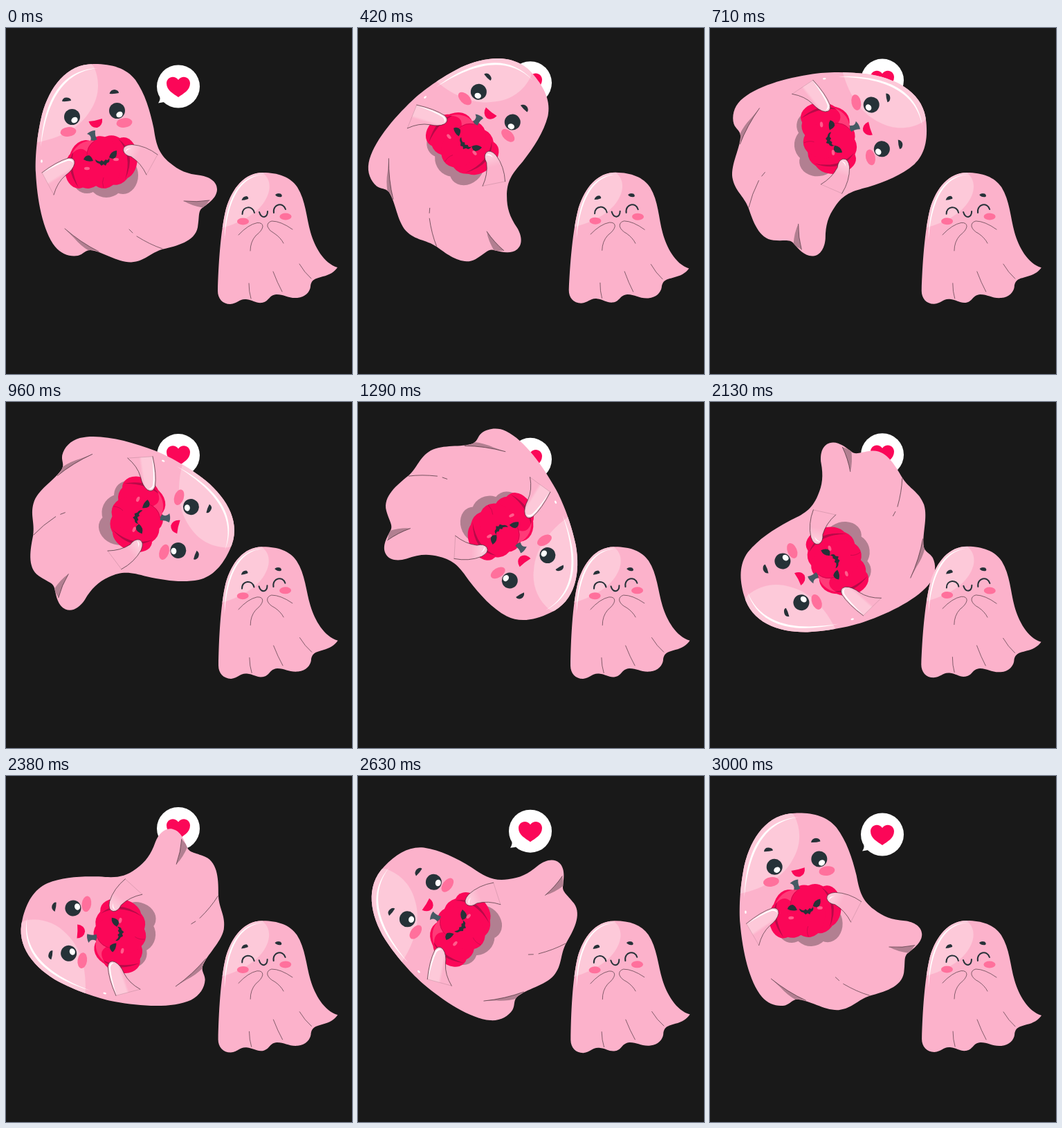
Recreate the animation shown at these times as an HTML page. Size 500 by 500 pixels, loop 3040 ms.

```html
<!DOCTYPE html>
<html>
<head>
<meta charset="utf-8">
<style>
  html, body { margin: 0; width: 100%; height: 100%; overflow: hidden; background: #191919; }
  svg { display: block; width: 100vw; height: 100vh; }
  .body { fill: #fcb2cb; }
  .gloss { fill: #fdc9d9; }
  .shade { fill: #b27f91; }
  .red { fill: #fb0758; }
  .deep { fill: #b80a48; }
  .dark { fill: #263238; }
  .cheek { fill: #ff709c; }
  .white { fill: #fff; }
  .line { fill: none; stroke: #33242a; stroke-width: .6; stroke-linecap: round; }
  .smile { fill: none; stroke: #263238; stroke-width: 2; stroke-linecap: round; }
</style>
</head>
<body>
<svg viewBox="0 0 500 500">
  <defs>
    <path id="bigShape" d="M128 52C88 51 63 85 52 125C44 158 42 190 43 209C45 248 53 293 71 316C80 327 93 331 104 329C112 327 114 321 122 321C140 323 161 339 181 338.500C201 337 208 325 227 319.500C246 315 273 309 277 288C280 271 277 264 285 259C293 253 305 245 305 233C305 222 294 215 281 213C262 211 250 206 237 195C220 181 217 168 213.500 145C208 119 201 95 187 75C174 58 153 52 128 52Z"/>
    <path id="smallShape" d="M371 209C345 209 327 231 318 261C310 293 307 343 306 380C306 391 313 399 324 399C335 398 337 391 347 392C357 393 361 398 370 397C381 395 379 386 391 385C402 385 408 391 421 390C433 389 439 381 440 374C441 362 449 362 458 359C467 357 474 353 479 346C459 340 446 316 440 295C434 274 433 249 421 230C411 215 393 209 371 209Z"/>
    <clipPath id="bigClip"><use href="#bigShape"/></clipPath>
    <clipPath id="smallClip"><use href="#smallShape"/></clipPath>
    <linearGradient id="leftArm" gradientUnits="userSpaceOnUse" x1="72" y1="200" x2="82" y2="216">
      <stop offset=".7" stop-color="#fdc9d9"/><stop offset=".9" stop-color="#fcb2cb"/>
    </linearGradient>
    <linearGradient id="rightArm" gradientUnits="userSpaceOnUse" x1="172" y1="174" x2="204" y2="190">
      <stop offset=".2" stop-color="#fdc9d9"/><stop offset=".6" stop-color="#fcb2cb"/>
    </linearGradient>
  </defs>

  <g id="bubble">
    <circle class="white" cx="249" cy="84.500" r="31"/>
    <path class="white" d="M222 96Q224 103 220 108.500Q228 108 234 105Z"/>
    <path class="red" d="M249 100C242 95 232 90 232 80C232 71 243 67 249 75C255 67 266 71 266 80C266 90 256 95 249 100Z"/>
  </g>

  <g id="big">
    <use href="#bigShape" class="body"/>
    <g clip-path="url(#bigClip)">
      <path class="gloss" d="M40 166C80 160 108 143 122 119C134 101 137 78 127 56L120 48H40Z"/>
      <path class="shade" d="M85 290Q108 310 134 323Q126 320 120 322Q108 315 98 303ZM257 250Q276 252 294 249L286 260Q268 257 257 250Z"/>
    </g>
    <path class="line" d="M85 290Q108 310 134 323M257 250Q276 252 294 249M178 291L183 296M189 301Q208 313 226 319"/>
    <path class="white" d="M50.500 172C54 111 76 60 133 58C79 63 58 112 50.500 172Z"/>
    <ellipse class="white" cx="51.500" cy="192.500" rx="1.300" ry="2.300"/>

    <path class="dark" d="M81 106Q82 100 88 100.500Q94 101 94 105Q88 106.500 81 106ZM149.500 95Q151 89 157 89Q163 90 163 94Q157 95.500 149.500 95Z"/>
    <g class="dark"><circle cx="95.500" cy="128.500" r="11.500"/><circle cx="160.500" cy="119.500" r="11.500"/></g>
    <g class="white">
      <ellipse cx="99" cy="133" rx="4.800" ry="4" transform="rotate(-30 99 133)"/>
      <ellipse cx="164" cy="125" rx="4.800" ry="4" transform="rotate(-30 164 125)"/>
    </g>
    <g class="cheek">
      <ellipse cx="90" cy="150" rx="11.500" ry="6.800" transform="rotate(-6 90 150)"/>
      <ellipse cx="171" cy="137" rx="11.500" ry="6.800" transform="rotate(-6 171 137)"/>
    </g>
    <path class="red" d="M119.500 135Q130 134 139 131Q140 141 132 144Q123 145 119.500 135Z"/>

    <g class="shade">
      <ellipse cx="117" cy="219" rx="20" ry="20"/><ellipse cx="145" cy="220" rx="26" ry="25"/>
      <ellipse cx="169" cy="213" rx="22" ry="27"/>
    </g>
    <g class="red">
      <ellipse cx="105" cy="204" rx="20" ry="28"/>
      <ellipse cx="170" cy="188" rx="20" ry="30"/>
      <ellipse cx="117" cy="197" rx="26" ry="35" transform="rotate(-6 117 197)"/>
      <ellipse cx="155" cy="191" rx="27" ry="36" transform="rotate(-10 155 191)"/>
      <ellipse cx="139" cy="194" rx="27" ry="38" transform="rotate(-8 139 194)"/>
    </g>
    <path class="deep" d="M162 160Q190 180 172 219Q183 183 162 160ZM98 177Q84 202 105 231Q91 202 98 177Z"/>
    <path d="M95 182Q106 161 128 163Q119 168 117 179Q107 169 95 182Z" fill="#ff3b78"/>
    <path d="M128 163Q116 171 117 187M141 231Q138 223 141 216" fill="none" stroke="#c70a4c" stroke-width=".8"/>
    <path d="M117 153Q123 148 129 148Q128 155 131.500 161Q127 164 122.500 162Q124 155 117 153Z" fill="#455a64"/>
    <path class="dark" d="M112 190Q114 184 120 184Q124 186 126 192Q118 194 112 190ZM149 187Q151 178 160 177Q161 186 156 189Q152 189 149 187ZM129 190q4 3 7 3l2-2 3 2 3-3 2 1q3-1 3-4 2 7-3 8l-2 4-3-2-3 2-3-3-3-1q-3-2-3-5z"/>
    <g fill="#ff5c8c">
      <ellipse cx="117" cy="203" rx="4" ry="2.200"/><ellipse cx="159" cy="190" rx="4" ry="2.200"/>
    </g>

    <path fill="url(#leftArm)" d="M52 209Q73 193 90 188Q100 187 99 196Q97 205 86 213Q74 223 69 241Z"/>
    <path class="line" d="M52 209Q73 193 90 188Q100 187 99 196Q97 205 86 213Q74 223 69 241"/>
    <path fill="url(#rightArm)" d="M219 183Q202 170 182 168.500Q169 169 169.500 177Q171 184 181 186Q195 195 203 212Z"/>
    <path class="line" d="M219 183Q202 170 182 168.500Q169 169 169.500 177Q171 184 181 186Q195 195 203 212"/>
    <path class="line" stroke-opacity=".35" style="stroke-width:.4" d="M52 209L69 241M219 183L203 212"/>
    <path class="white" d="M54 209Q76 193 91 189.500Q97 190 97 195Q94 191 89 192Q76 196 54 209ZM172 180Q173 173 181 174Q175 175 172 180Z"/>
  </g>

  <g id="small">
    <use href="#smallShape" class="body"/>
    <path class="gloss" clip-path="url(#smallClip)" d="M300 292C335 284 362 270 374 250C384 234 382 220 374 212L368 205H300Z"/>
    <path class="white" d="M316 306C316 263 329 213 372 212C332 215 319 262 316 306Z"/>
    <path class="dark" d="M340.500 249Q342 243 348 243Q351 245 350 247Q345 249 340.500 249ZM389 241Q392 238 397 239.500Q400 242 398 244Q392 245 389 241Z"/>
    <path class="smile" d="M341.500 269C341 257 357 256 359 267M387 267C385 254 401 251 404 262M366 266Q368 273 373 273Q378 272 378 265"/>
    <g class="cheek">
      <ellipse cx="342.500" cy="279.500" rx="8.500" ry="5"/><ellipse cx="404" cy="272.500" rx="8.500" ry="5"/>
    </g>
    <path class="line" d="M336 299Q350 284 363 281.500Q371 281 371 287Q370 293 361 300Q353 309 353 322M414 291Q397 279 384 279Q377 281 378 287Q380 293 388 297Q397 303 401 311M351 369Q351 381 354 391M386 352Q392 368 399 381M424 341Q431 353 441 362"/>
  </g>
</svg>
<script>
  const loop = 3040, stepsPerMs = .024, degPerStep = 4.972;
  const move = (id, value) => document.getElementById(id).setAttribute("transform", value);
  const start = performance.now();

  function draw(now) {
    const t = Math.max(0, now - start) % loop;
    const step = Math.floor((t + 5) * stepsPerMs);
    const angle = step * degPerStep;
    const phase = angle * Math.PI / 90; // two sways per turn
    move("big", `rotate(${angle} 174 195.5)`);
    move("small", `rotate(${Math.sin(phase)} 392 304)`);
    move("bubble", `translate(0 ${4.5 * (Math.cos(phase) - 1)})`);
    requestAnimationFrame(draw);
  }
  draw(start);
</script>
</body>
</html>
```
